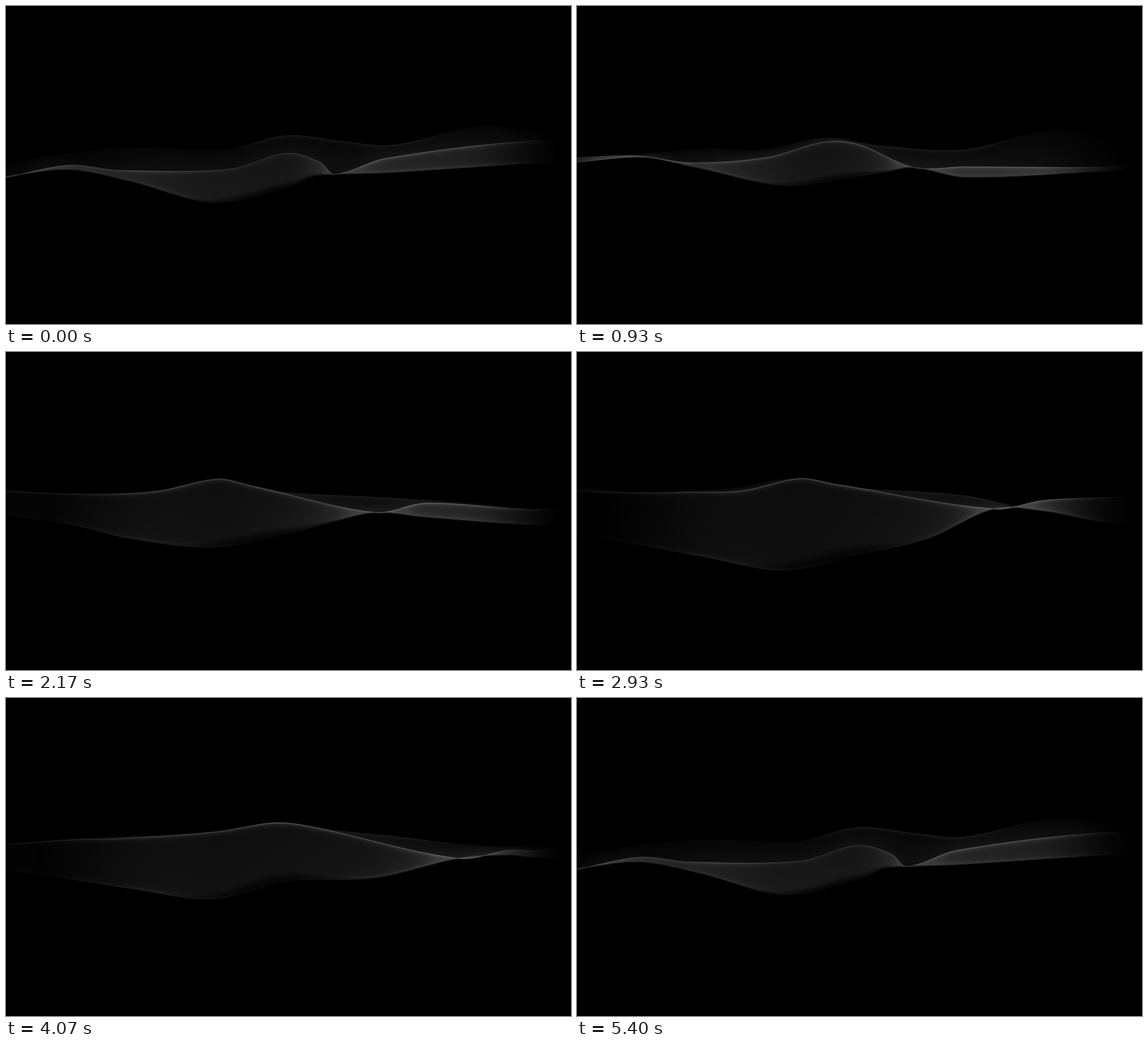
Animation of 998x561 px, one loop 5430 ms. Source, as an HTML page with a canvas:

```html
<!DOCTYPE html>
<html lang="en">
<head>
<meta charset="utf-8">
<title>Silk wave</title>
<style>
  html, body { margin: 0; width: 100%; height: 100%; overflow: hidden; background: #000; }
  canvas { display: block; }
</style>
</head>
<body>
<canvas id="stage" width="998" height="561"></canvas>
<script>
const WIDTH = 998, TOP = 195, ROWS = 200, LOOP = 5430;

const clamp = (v, lo = 0, hi = 1) => Math.min(hi, Math.max(lo, v));
const mix = (a, b, k) => a + (b - a) * k;
const smooth = (a, b, v) => { const k = clamp((v - a) / (b - a)); return k * k * (3 - 2 * k); };
const bell = (x, centre, spread) => Math.exp(-(((x - centre) / spread) ** 2));
const cosDeg = degrees => Math.cos(degrees * Math.PI / 180);

// Smooth curve through [x, y] points, sampled once per pixel column.
function curve(points) {
  const last = points.length - 1;
  const slope = i => {
    const [x0, y0] = points[Math.max(i - 1, 0)], [x1, y1] = points[Math.min(i + 1, last)];
    return (y1 - y0) / (x1 - x0);
  };
  const heights = new Float32Array(WIDTH);
  for (let i = 0; i < last; i++) {
    const [x0, y0] = points[i], [x1, y1] = points[i + 1];
    const span = x1 - x0, s0 = slope(i) * span, s1 = slope(i + 1) * span;
    for (let x = Math.ceil(x0); x < Math.min(x1, WIDTH); x++) {
      const k = (x - x0) / span, ease = k * k * (3 - 2 * k);
      heights[x] = mix(y0, y1, ease) + k * (1 - k) * ((1 - k) * s0 - k * s1);
    }
  }
  return heights;
}

// The ribbon's three folds: key points that swing once and twice per loop.
function folds(angle) {
  const swing = (mean, amp, phase, amp2 = 0, phase2 = 0) =>
    mean + amp * cosDeg(angle - phase) + amp2 * cosDeg(2 * angle - phase2);
  const crest = swing(438, 65, -30);
  const twist = swing(675, 110, 235, 35, 160);
  const pinch = swing(285, 9, 0, 5, -60);

  const front = curve([
    [0, swing(266, 28, 0, 8, 0)],
    [110, swing(259, 16, 10, 6, 0)],
    [200, swing(262, 22, 20, 7, 15)],
    [crest - 100, swing(255, 22, 20, 12, 10)],
    [crest, swing(233, 18, 12, 9, 0)],
    [crest + 60, swing(242, 20, 10, 14, -15)],
    [twist, pinch],
    [twist + 90, swing(270, 8, 60, 6, 150)],
    [930, swing(266, 18, 125, -18, 0)],
    [1010, swing(264, 12, 110, -12, 0)]
  ]);
  const base = curve([
    [0, swing(294, 24, 250, 15, 20)],
    [110, swing(301, 35, 230, 10, 20)],
    [220, swing(322, 33, 225, 10, 10)],
    [365, swing(346, 28, 235, 17, 25)],
    [500, swing(320, 22, 225, 17, 35)],
    [(500 + twist) / 2, swing(306, 19, 235, 10, 60)],
    [twist, pinch],
    [twist + 90, swing(288, 13, 65)],
    [930, swing(289, 15, 145)],
    [1010, swing(287, 14, 160)]
  ]);
  const veil = curve([
    [0, swing(258, 20, 0)],
    [110, swing(254, 8, 40)],
    [230, swing(247, 5, 60)],
    [crest - 110, swing(247, 8, 30)],
    [crest, swing(226, 7, 70)],
    [crest + 100, swing(240, 8, 100)],
    [680, swing(250, 8, 125)],
    [850, swing(248, 38, 200)],
    [1010, swing(262, 26, 170)]
  ]).map((y, x) => Math.min(y, front[x]));
  return { front, base, veil };
}

const ctx = document.getElementById("stage").getContext("2d");
const picture = ctx.createImageData(WIDTH, ROWS);
const light = new Float32Array(ROWS);

// Adds one column of translucent sheet between heights a and b.
function sheet(x, a, b, { fill, edgeA = 0, edgeB = 0, rise = 0, weave = 0, soft = 0 }) {
  const lo = Math.min(a, b), hi = Math.max(a, b), h = hi - lo;
  const fade = Math.max(smooth(0, 330, x), Math.exp(-h / 25) * smooth(-80, 60, x));
  const body = fill * (100 / Math.max(h, 14)) ** 0.6;
  const edgeScale = 0.5 + 0.5 * Math.min(1, h / 20);
  const threads = weave * 0.2 * clamp((h - 60) / 60);
  const end = Math.min(TOP + ROWS - 1, Math.ceil(hi) + 1);
  for (let y = Math.max(TOP, Math.floor(lo) - 1); y <= end; y++) {
    const cover = clamp(Math.min(y - lo, hi - y) + 1.3);
    const fromA = Math.abs(y - a), fromB = Math.abs(y - b);
    const u = clamp(fromA / Math.max(h, 1));
    const tone = (1 - rise * (1 - u)) * (1 + threads * Math.sin(u * 251));
    const softness = soft ? 0.15 + 0.85 * smooth(0, soft * h + 1, fromB) : 1;
    const glow = edgeA * Math.exp(-fromA / 3) + edgeB * Math.exp(-fromB / 3);
    light[y - TOP] += cover * fade * (body * tone * softness + glow * edgeScale);
  }
}

function draw(time) {
  const { front, base, veil } = folds(time / LOOP * 360);
  for (let x = 0; x < WIDTH; x++) {
    const middle = bell(x, 460, 110);
    const depth = front[x] - veil[x];
    const fade = 1 - smooth(800, 995, x);
    const veilEdge = 9 * smooth(380, 480, x) * (1 - smooth(700, 820, x));
    const soft = 0.2 * middle;
    light.fill(0);
    sheet(x, front[x], base[x], {
      fill: 13,
      edgeA: 38 / (1 + middle * depth / 15),
      edgeB: 26 * (1 - 0.8 * middle),
      weave: smooth(240, 340, x) * (1 - smooth(600, 720, x)),
      soft
    });
    sheet(x, veil[x], front[x], { fill: 6, edgeA: veilEdge, rise: 0.7 });
    sheet(x, veil[x], base[x], { fill: 6, edgeA: veilEdge, rise: 0.6, soft });
    for (let row = 0; row < ROWS; row++) {
      const o = (row * WIDTH + x) * 4;
      picture.data[o] = picture.data[o + 1] = picture.data[o + 2] = light[row] * fade;
      picture.data[o + 3] = 255;
    }
  }
  ctx.putImageData(picture, 0, TOP);
}

const start = performance.now();
function tick() {
  draw((performance.now() - start) % LOOP);
  requestAnimationFrame(tick);
}
tick();
</script>
</body>
</html>
```
